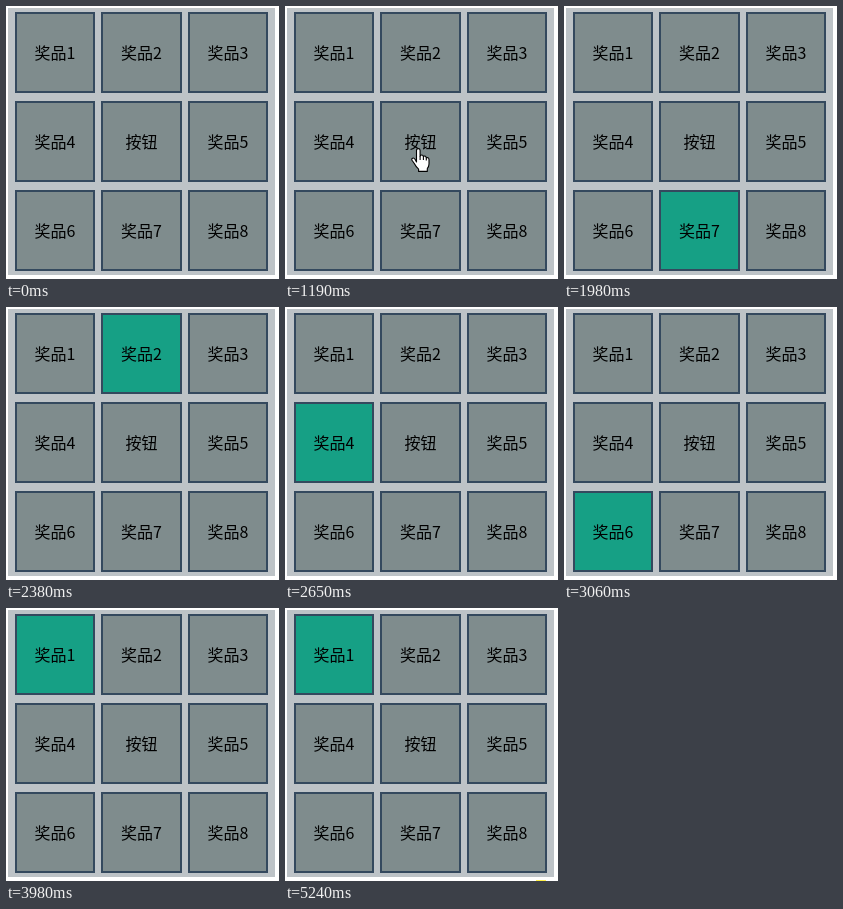
Animation of 273 by 273 pixels, one loop 5.31 s. Source, as an HTML page:

```html
<!DOCTYPE html>
<html lang="zh">
<head>
<meta charset="utf-8">
<title>九宫格抽奖</title>
<style>
  html, body { margin: 0; width: 100%; height: 100%; overflow: hidden; background: #fff; }
  svg { display: block; width: 273px; height: 273px; }
  text { font: 16px "Noto Sans CJK SC", "Noto Sans CJK", sans-serif; text-anchor: middle; }
  .cell { fill: #7f8c8d; stroke: #34495e; stroke-width: 2; }
  .cursor { fill: #fff; stroke: #000; stroke-width: 1.1; stroke-linejoin: round; }
</style>
</head>
<body>
<svg viewBox="0 0 273 273">
  <rect x="2" y="2" width="267" height="267" fill="#bdc3c7"/>
  <g id="grid"></g>
  <path id="arrow" class="cursor" d="M.5 .5V16L4 12.7L6.4 18.3L8.7 17.3L6.3 11.8H11.3Z"/>
  <g id="hand" class="cursor">
    <path d="M5.5 14V2.5Q5.5 .6 7.3 .6T9.1 2.5V8Q9.5 7 10.8 7T12.4 8.6Q13 7.8 14 8T15.3 9.8Q18 9 18 11.8V16Q18 18.5 16.3 20.5V23.4H7.6V21.2Q5 18.8 3.3 15.5L1 12.3Q.3 10.8 1.6 10.2T4 11.3Z"/>
    <path fill="none" d="M9.1 8V12M12.4 8.6V12M15.3 9.8V12.5"/>
  </g>
  <rect id="spark" x="251" y="272" width="10" height="1" fill="#fff04a"/>
</svg>
<script>
const LOOP = 5310;
const columns = [[9, 80], [95, 81], [182, 80]];
const labels = ["奖品1", "奖品2", "奖品3", "奖品4", "按钮", "奖品5", "奖品6", "奖品7", "奖品8"];

// [start ms, lit prize]
const prizeSteps = [
  [0, 0], [1330, 1], [1460, 2], [1590, 4], [1720, 5], [1850, 6], [1980, 7],
  [2110, 1], [2380, 2], [2510, 3], [2650, 4], [2910, 5], [3060, 6],
  [3320, 7], [3580, 8], [3980, 1]
];

// [start ms, cursor shape, x, y]
const cursorSteps = [
  [0, ""], [660, "arrow", 118, 210], [790, "arrow", 117, 186],
  [920, "hand", 116, 161], [1060, "hand", 121, 151], [1190, "hand", 126, 142],
  [1330, "hand", 122, 161], [1460, "arrow", 124, 212], [1590, ""]
];

const byId = id => document.getElementById(id);
const grid = byId("grid");

function add(tag, attrs, text = "") {
  const node = document.createElementNS(grid.namespaceURI, tag);
  for (const key in attrs) node.setAttribute(key, attrs[key]);
  node.textContent = text;
  return grid.appendChild(node);
}

const prizes = [];
labels.forEach((label, i) => {
  const [x, width] = columns[i % 3];
  const y = 6 + 89 * Math.floor(i / 3);
  const cell = add("rect", { class: "cell", x: x + 1, y: y + 1, width: width - 2, height: 79 });
  add("text", { x: x + width / 2, y: y + 47 }, label);
  if (i !== 4) prizes.push(cell);
});

const stepAt = (steps, t) => steps.findLast(step => step[0] <= t);

function draw(t) {
  const lit = stepAt(prizeSteps, t)[1];
  prizes.forEach((cell, i) => cell.style.fill = i + 1 === lit ? "#16a085" : "");

  const [, shape, x, y] = stepAt(cursorSteps, t);
  for (const id of ["arrow", "hand"]) {
    const node = byId(id);
    node.style.display = id === shape ? "" : "none";
    if (id === shape) node.setAttribute("transform", `translate(${x} ${y})`);
  }
  byId("spark").style.display = t >= 5240 ? "" : "none";
}

const start = performance.now();
function tick() {
  draw((performance.now() - start) % LOOP);
  requestAnimationFrame(tick);
}
tick();
</script>
</body>
</html>
```
